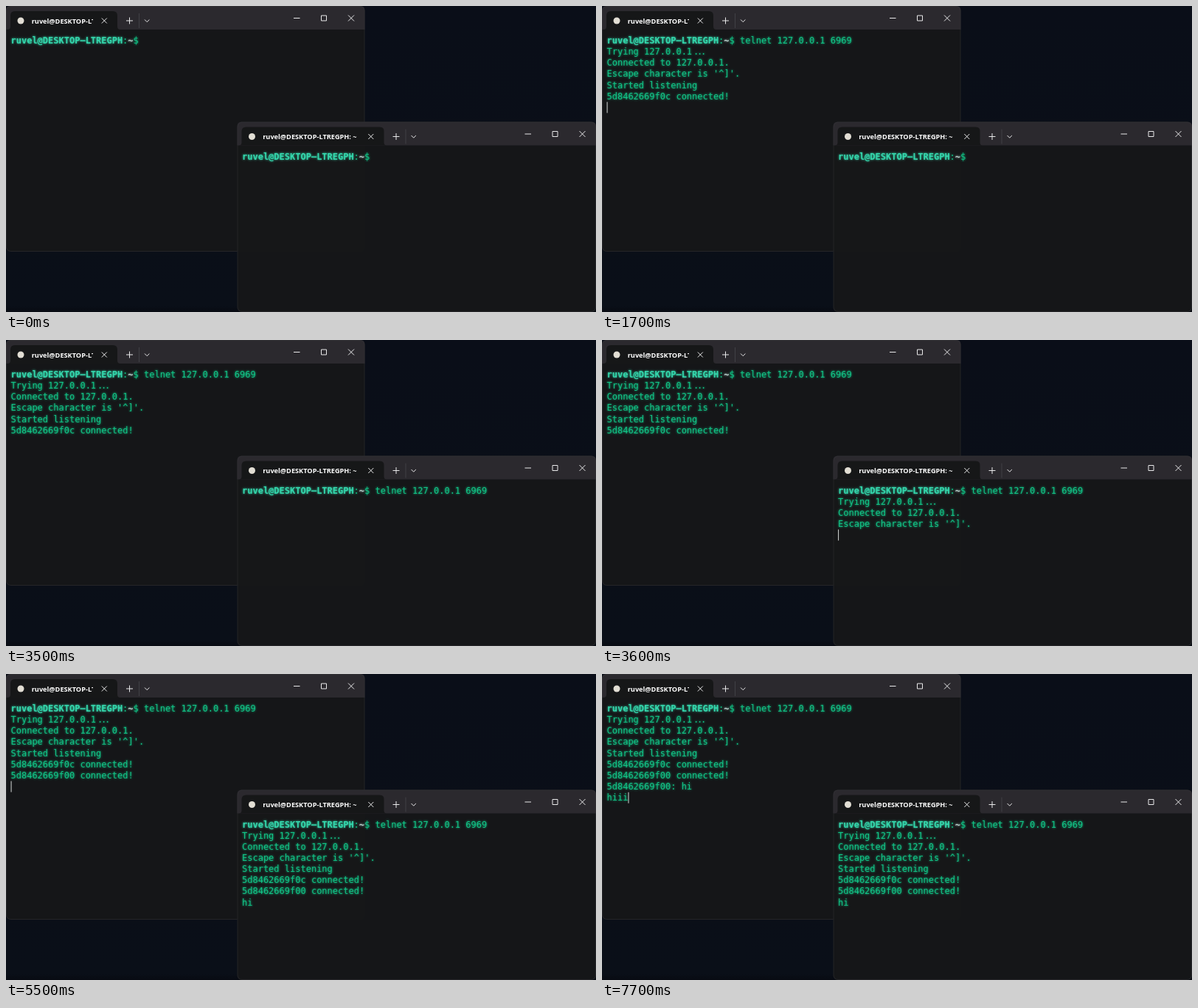
An HTML page that plays this animation: 800 px wide and 416 px high, repeating every 8 s.

```html
<!DOCTYPE html>
<html lang="en">
<head>
<meta charset="utf-8">
<title>Telnet chat</title>
<style>
  html, body { margin: 0; width: 100%; height: 100%; overflow: hidden; background: #0a0e17; }
  svg { display: block; width: 100vw; height: 100vh; }
  .term { font: 12px "DejaVu Sans Mono", "Noto Sans Mono", monospace; fill: #12c587; }
  .user { font-weight: 700; fill: #34d8ad; }
  .path { font-weight: 700; fill: #b9d6d0; }
  .title { font: 700 9.2px "Open Sans", "Noto Sans", sans-serif; fill: #fff; }
  .icon { fill: none; stroke: #e9e9ea; stroke-width: 1; }
</style>
</head>
<body>
<svg viewBox="0 0 800 416" preserveAspectRatio="none" xmlns="http://www.w3.org/2000/svg">
  <defs>
    <linearGradient id="desk" x1="0" y1="0" x2="0" y2="1">
      <stop offset="0" stop-color="#0a0e18"/>
      <stop offset=".98" stop-color="#0a0f18"/>
      <stop offset="1" stop-color="#080b12"/>
    </linearGradient>
    <filter id="glow" filterUnits="userSpaceOnUse" x="0" y="32" width="487" height="303"
            color-interpolation-filters="sRGB">
      <feGaussianBlur stdDeviation="1.6" result="halo"/>
      <feMerge>
        <feMergeNode in="halo"/>
        <feMergeNode in="SourceGraphic"/>
      </feMerge>
    </filter>
    <clipPath id="tabClip"><rect x="30" y="8" width="88" height="24"/></clipPath>
  </defs>
  <rect width="800" height="416" fill="url(#desk)"/>
  <g id="stage"></g>
</svg>
<script>
const LOOP = 8000;
const CELL = 7.22, ROW = 15.15, LEFT = 6.5, BASE = 51;
const HOST = "ruvel@DESKTOP-LTREGPH";
const COMMAND = "telnet 127.0.0.1 6969";
const GREETING = [
  'Trying 127.0.0.1<tspan dx="1.8" letter-spacing="-2.2">...</tspan>',
  "Connected to 127.0.0.1.",
  "Escape character is '^]'.",
  "Started listening",
  "5d8462669f0c connected!",
  "5d8462669f00 connected!"
];

// Each step: time, printed rows, text being typed, caret visible
const windows = [
  {
    x: 0, y: 0, height: 334, tabEnd: 151, clip: true,
    rows: [...GREETING, "5d8462669f00: hi"],
    steps: [
      [0, 0, "", 0], [300, 0, "", 1], [900, 0, COMMAND, 1], [1300, 0, COMMAND, 0],
      [1600, 3, "", 1], [1700, 5, "", 1], [2200, 5, "", 0], [3700, 6, "", 1],
      [5600, 7, "", 1], [6800, 7, "h", 1], [6900, 7, "hi", 1], [7000, 7, "hii", 1],
      [7100, 7, "hi", 1], [7200, 7, "h", 1], [7500, 7, "hii", 1],
      [7600, 7, "hiiii", 1], [7700, 7, "hiii", 1]
    ]
  },
  {
    x: 313.5, y: 157.5, height: 258.5, tabEnd: 199, clip: false,
    rows: [...GREETING, "hi"],
    steps: [
      [0, 0, "", 0], [2600, 0, "", 1], [2900, 0, COMMAND, 1], [3500, 0, COMMAND, 0],
      [3600, 3, "", 1], [3700, 6, "", 1], [4200, 6, "", 0], [4600, 6, "h", 1],
      [4700, 6, "hi", 1], [4800, 6, "hii", 1], [4900, 6, "hi", 1], [5300, 6, "hi", 0],
      [5600, 7, "", 1], [6200, 7, "", 0]
    ]
  }
];

const textAt = (col, row, text, cls = "") =>
  `<text class="${cls}" x="${LEFT + col * CELL}" y="${BASE + row * ROW}">${text}</text>`;

const cross = (x, y, r) => `M${x - r} ${y - r}l${2 * r} ${2 * r}m0 ${-2 * r}l${-2 * r} ${2 * r}`;

function chrome({ height, tabEnd, clip }) {
  const icons = [
    cross(tabEnd - 17.7, 20, 3.5),
    `M${tabEnd + 12} 20h9m-4.5 -4.5v9`,
    `M${tabEnd + 37} 18.5l3.2 3.2l3.2 -3.2`,
    "M390 16.5h8.5",
    "M427.5 13h7v7h-7z",
    cross(468, 16.5, 4)
  ].join("");
  return `
    <rect width="486.5" height="${height}" rx="6" fill="#161718" fill-opacity=".97"/>
    <path d="M0 32V6q0 -6 6 -6h474.5q6 0 6 6V32z" fill="#2b292e"/>
    <path d="M2 32q4 0 4 -4V13q0 -6 6 -6H${tabEnd - 6}q6 0 6 6V28q0 4 4 4z" fill="#161718"/>
    <rect x=".5" y=".5" width="485.5" height="${height - 1}" rx="6" fill="none" stroke="#39393d" stroke-opacity=".45"/>
    <circle cx="20" cy="20" r="4.5" fill="#e2ded4"/>
    <text class="title" x="34.7" y="23.7" ${clip ? 'clip-path="url(#tabClip)"' : ""}>${HOST}: ~</text>
    <path d="M${tabEnd + 29.5} 10v20" stroke="#414045"/>
    <path class="icon" d="${icons}"/>`;
}

const prompt = textAt(0, 0, HOST.replace("-", "–"), "user") + textAt(21, 0, ":") +
  textAt(22, 0, "~", "path") + textAt(23, 0, "$");

function screen({ rows, steps }, time) {
  const [, printed, typed, caret] = steps.findLast(step => step[0] <= time);
  const col = printed ? 0 : 25;
  const row = printed ? printed + 1 : 0;
  const lines = rows.slice(0, printed).map((line, i) => textAt(0, i + 1, line));
  if (printed) lines.push(textAt(25, 0, COMMAND));
  const text = prompt + lines.join("") + textAt(col, row, typed);
  const caretX = LEFT + (col + typed.length) * CELL;
  const caretY = BASE - 11.5 + row * ROW;
  return `<g filter="url(#glow)">${text}</g>` +
    (caret ? `<rect x="${caretX}" y="${caretY}" width="1.1" height="15" fill="#c4c8c7"/>` : "");
}

document.getElementById("stage").innerHTML = windows.map(w => `
  <g transform="translate(${w.x} ${w.y})">${chrome(w)}<g class="term"></g></g>`).join("");
const terms = document.querySelectorAll(".term");
const shown = [];

function draw(time) {
  windows.forEach((w, i) => {
    const markup = screen(w, time);
    if (markup !== shown[i]) terms[i].innerHTML = shown[i] = markup;
  });
}

const start = performance.now();
function tick() {
  draw((performance.now() - start) % LOOP);
  requestAnimationFrame(tick);
}
tick();
</script>
</body>
</html>
```
